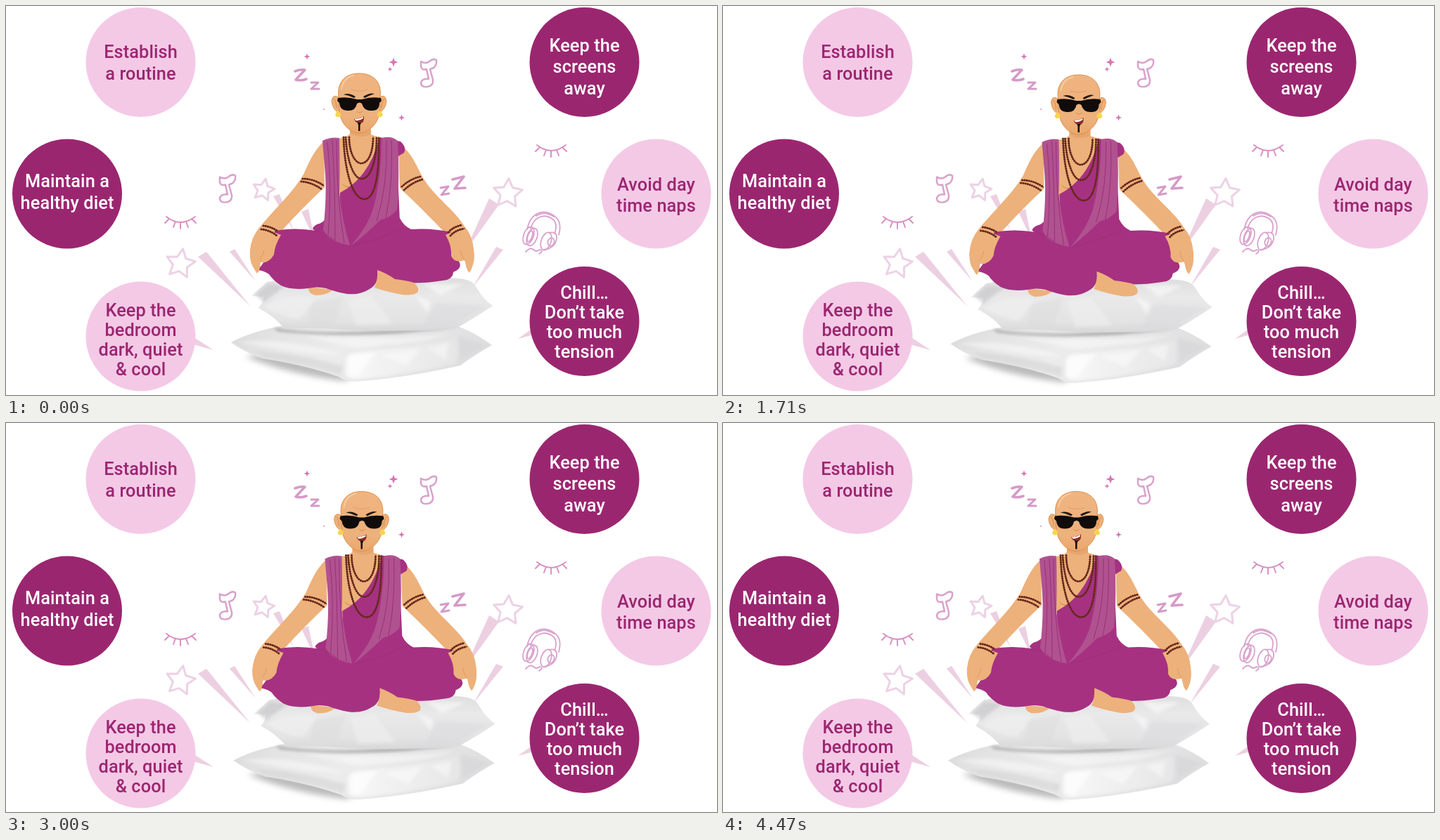
An HTML page that plays this animation: 1011 by 554 pixels, repeating every 4500 ms.

```html
<!DOCTYPE html>
<html lang="en">
<head>
<meta charset="utf-8">
<title>Better sleep tips</title>
<style>
html, body { margin: 0; width: 100%; height: 100%; overflow: hidden; background: #fff; }
svg { display: block; width: 100%; height: 100%; }
text { font: 500 25.3px Roboto, Inter, sans-serif; letter-spacing: .1px; text-anchor: middle; }
.line { fill: none; stroke-linecap: round; stroke-linejoin: round; }
.icon { stroke: #d9a2cc; }
.skin { fill: #edb17b; }
.robe { fill: #a63181; }
.shawl { fill: #b0528f; }
.fold { stroke: #9a3079; stroke-width: 1; }
.bead { stroke: #64281c; stroke-width: 3.2; stroke-dasharray: 0 3.3; }
.cord { stroke: #7a3524; stroke-width: 1.5; }
</style>
</head>
<body>
<svg id="stage" viewBox="0 0 1011 554" preserveAspectRatio="none">
  <defs>
    <linearGradient id="upper" x1="0" y1="0" x2="0" y2="1">
      <stop offset="0" stop-color="#dededf"/><stop offset=".35" stop-color="#e9e9ea"/>
      <stop offset=".8" stop-color="#e3e3e4"/><stop offset="1" stop-color="#d8d8d9"/>
    </linearGradient>
    <linearGradient id="lower" x1="0" y1="0" x2="1" y2=".25">
      <stop offset="0" stop-color="#d8d8d9"/><stop offset=".2" stop-color="#e4e4e5"/>
      <stop offset=".5" stop-color="#ececed"/><stop offset="1" stop-color="#dededf"/>
    </linearGradient>
    <linearGradient id="front" x1="0" y1="0" x2="1" y2="0">
      <stop offset="0" stop-color="#f8f8f8"/><stop offset=".5" stop-color="#efeff0"/>
      <stop offset="1" stop-color="#e6e6e7"/>
    </linearGradient>
    <linearGradient id="face" x1="0" y1="0" x2="0" y2="1">
      <stop offset="0" stop-color="#efb481"/><stop offset=".75" stop-color="#edb17b"/>
      <stop offset="1" stop-color="#eba66c"/>
    </linearGradient>
    <filter id="soft" x="-20%" y="-60%" width="140%" height="220%"><feGaussianBlur stdDeviation="4"/></filter>
    <filter id="haze" x="-20%" y="-20%" width="140%" height="140%"><feGaussianBlur stdDeviation="2"/></filter>
    <path id="note" d="M590 79 Q597 83 602 79 Q607 74 612 77 Q613 84 608 88 L603 90 L607 105 Q608 114 599 115 Q590 116 590 109 Q592 103 601 104 L598 90 Q591 92 590 86 Z"/>
    <g id="lash"><path d="M228 300 Q248 316 269 300"/><path d="M232 303 L226 309 M241 307 L238 315 M248 308 V317 M256 307 L259 315 M264 303 L270 309"/></g>
  </defs>

  <g fill="#ecd0e2">
    <path d="M273 357 L285 350 L347 427Z"/>
    <path d="M318 350 L325 346 L355 392Z"/>
    <path d="M380 271 L389 268 L409 320Z"/>
    <path d="M420 293 L430 289 L439 333Z"/>
    <path d="M687 274 L701 283 L652 351Z"/>
    <path d="M697 343 L707 347 L664 400Z"/>
    <path d="M266 471 L266 482 L295 490Z"/>
    <path d="M750 458 L750 468 L728 474Z"/>
  </g>
  <g id="stars" class="line" stroke="#ecd2e5" stroke-width="3"/>
  <g id="sparks" fill="#d873b5"/>

  <g class="line" stroke="#d59bc7" stroke-width="3.6">
    <path d="M411 93 Q418 90 425 91 L412 105 Q420 107 427 104"/>
    <path d="M434 109 L444 109 L434 118 L445 118" stroke-width="3"/>
    <path d="M618 259 L629 257 L619 269 L630 267" stroke-width="2.8"/>
    <path d="M635 247 L651 243 L638 260 L653 259"/>
  </g>
  <g class="line icon" stroke-width="2.5">
    <use href="#note"/>
    <use href="#note" x="-286" y="164.5"/>
  </g>
  <g class="line" stroke="#d991c3" stroke-width="2">
    <use href="#lash"/>
    <use href="#lash" x="527" y="-102"/>
  </g>

  <g class="line icon" stroke-width="1.8">
    <path d="M741 318 C746 294 765 287 781 300 Q791 308 786 326"/>
    <path d="M746 317 C750 301 765 294 778 304 Q785 311 780 324"/>
    <path d="M754 299 Q765 291 779 300"/>
    <ellipse cx="743" cy="327" rx="7" ry="13" transform="rotate(20 743 327)"/>
    <ellipse cx="748" cy="329" rx="7" ry="13" transform="rotate(20 748 329)"/>
    <ellipse cx="745" cy="328" rx="3" ry="8" transform="rotate(20 745 328)"/>
    <ellipse cx="768" cy="335" rx="7" ry="13" transform="rotate(18 768 335)"/>
    <path d="M772 323 Q784 320 783 332 Q780 345 765 347"/>
    <ellipse cx="775" cy="336" rx="4.5" ry="6" transform="rotate(18 775 336)"/>
    <path d="M739 350 Q746 343 750 347 T759 347 Q765 349 758 353"/>
  </g>

  <g id="tips"/>

  <g id="sitter">
    <!-- cushions -->
    <path d="M340 499 Q400 524 480 534 L500 524 L400 490Z" fill="#777" opacity=".5" filter="url(#soft)"/>
    <path d="M320 479 Q348 464 390 456 L645 457 Q668 466 691 483 Q666 497 646 512 Q570 529 507 534 Q485 537 473 528 Q425 511 365 502 Q337 492 320 479Z" fill="url(#lower)"/>
    <g filter="url(#haze)">
      <path d="M483 505 Q483 495 500 493 Q575 487 638 473 Q645 490 639 509 Q570 526 507 531 Q488 534 483 526Z" fill="url(#front)"/>
      <path d="M330 479 Q400 471 478 497 Q420 496 372 486Z" fill="#fff" opacity=".4"/>
      <path d="M350 491 Q420 495 479 513 L476 525 Q420 510 365 500Z" fill="#d2d2d3" opacity=".55"/>
      <path d="M420 470 Q520 477 635 467 L590 478 L500 487Z" fill="#fff" opacity=".4"/>
      <path d="M643 470 L682 483 L646 505Z" fill="#d0d0d1" opacity=".4"/>
      <path d="M488 498 Q507 495 525 494 Q511 512 500 528 L488 526Z" fill="#fff" opacity=".7"/>
      <path d="M535 497 L589 488 L569 513Z M600 487 L630 480 L625 504Z" fill="#fff" opacity=".4"/>
      <path d="M380 458 Q430 468 520 463 L642 458 L560 466 Q460 472 386 463Z" fill="#888" opacity=".65"/>
    </g>
    <path d="M349 413 L371 393 Q430 382 500 388 L585 391 Q632 384 655 390 Q665 393 669 401 Q679 418 692 427 Q672 441 640 459 Q565 465 480 461 Q430 457 396 460 Q382 442 359 430 Q365 423 367 414Z" fill="url(#upper)"/>
    <g filter="url(#haze)">
      <path d="M354 411 L372 396 L398 398 Q380 411 367 422Z" fill="#c4c4c6" opacity=".6"/>
      <path d="M367 428 Q400 408 440 416 L418 446 Q390 443 367 428Z" fill="#f2f2f2" opacity=".6"/>
      <path d="M434 423 L480 413 L466 455 L428 453Z" fill="#d9d9da" opacity=".4"/>
      <path d="M486 418 L520 413 L550 453 L497 455Z" fill="#f0f0f0" opacity=".6"/>
      <path d="M582 412 L604 421 L600 437Z M594 396 L650 396 L617 412Z" fill="#fff" opacity=".5"/>
      <path d="M610 423 L684 427 L641 452 L592 456Z" fill="#d8d8d9" opacity=".4"/>
    </g>

    <!-- arms -->
    <path class="skin" d="M452 193 C438 205 431 222 423 240 C407 267 378 293 360 316 Q350 329 347 348 Q346 364 352 373 L357 381 Q363 374 361 361 L392 320 Q421 288 453 258Z"/>
    <path class="skin" d="M558 196 C576 207 582 224 592 243 C607 270 638 290 652 314 Q663 326 665 347 Q667 363 662 373 L659 380 Q653 374 653 361 L626 325 Q593 290 560 259Z"/>

    <!-- feet and legs -->
    <path class="skin" d="M430 400 Q429 410 441 412 Q456 412 465 404Z"/>
    <path class="robe" d="M382 320 Q410 315 441 320 Q431 318 442 311 Q451 309 455 302 L560 302 Q565 313 576 318 Q606 316 632 322 L643 362 Q651 373 636 379 Q635 390 621 391 Q590 396 563 394 Q545 387 530 377 Q529 397 517 403 Q503 412 485 410 Q468 407 455 402 Q442 399 430 402 Q405 405 391 398 Q380 391 374 382 Q367 377 358 376 Q379 352 382 320Z"/>
    <path class="skin" d="M528 376 Q542 381 553 389 Q570 391 580 394 Q589 402 585 408 Q578 413 563 411 Q541 407 524 401 Q529 390 528 376Z"/>

    <!-- hands -->
    <path class="skin" d="M361 315 L391 326 Q382 341 381 354 Q374 367 362 365 L360 377 Q357 384 354 374 Q347 366 347 350 Q348 329 361 315Z"/>
    <path class="skin" d="M625 326 L652 314 Q663 327 665 347 Q667 363 662 374 Q658 384 655 371 L652 362 Q638 367 633 356 Q634 341 625 326Z"/>
    <path class="line" d="M361 361 Q366 355 367 348 M652 362 Q647 355 646 348" stroke="#dd9a62" stroke-width="1"/>

    <!-- torso -->
    <path class="skin" d="M489 168 H519 V183 Q530 187 546 190 L535 270 L475 272 L466 190 Q488 187 489 181Z"/>
    <path d="M489 176 Q502 186 519 176 V183 Q503 190 489 181Z" fill="#dd9b63" opacity=".5"/>
    <path class="line" d="M479 254 Q485 261 494 256" stroke="#cd864e" stroke-width="1"/>
    <path class="robe" d="M531 187 L561 193 Q570 201 566 209 L556 215 L560 307 Q554 337 491 342 L475 316 V266 Q517 244 531 187Z"/>
    <path class="shawl" d="M450 192 Q461 186 474 188 Q475 231 474 264 Q477 302 489 341 Q470 338 457 328 L451 319 Q457 267 453 228Z"/>
    <path class="shawl" d="M534 188 Q548 184 557 192 Q560 246 556 290 Q549 300 532 305 Q514 323 490 342 Q516 312 523 285 Q534 243 534 188Z"/>
    <path class="line fold" d="M457 194 Q464 255 458 326 M464 191 Q468 257 468 333 M470 192 Q470 275 481 338 M541 192 Q543 257 527 306 M548 191 Q550 259 540 301 M438 320 Q453 322 468 334 M490 342 Q528 333 562 318"/>

    <!-- beads -->
    <g id="beads" class="line"/>

    <!-- head -->
    <g class="skin" stroke="#e0944f">
      <path d="M475 132 Q465 123 463 135 Q464 148 475 153Z"/>
      <path d="M529 132 Q539 123 541 135 Q540 148 529 153Z"/>
    </g>
    <path d="M466 132 Q470 136 470 145 M538 132 Q534 136 534 145" class="line" stroke="#d98b4d"/>
    <path d="M473 130 C470 107 484 96 502 96 C521 96 535 107 532 130 C533 151 530 163 522 171 Q513 181 502 181 Q491 181 483 171 C475 162 473 151 473 130Z" fill="url(#face)" stroke="#df8e48"/>
    <path d="M477 118 Q480 102 494 99" class="line" stroke="#f6cc9f" stroke-width="2"/>
    <path d="M491 119 Q502 123 514 119" class="line" stroke="#e1a06c"/>
    <path d="M471 149 Q477 151 476 157 Q470 160 468 155Z M533 149 Q527 151 528 157 Q534 160 536 155Z" fill="#f8d44f"/>
    <path d="M480 126 Q488 123 497 129 L495 131 Q487 127 480 126Z M524 125 Q517 123 508 129 L510 131 Q518 127 524 125Z" fill="#211812"/>
    <path d="M472 131 Q486 129 499 133 H506 Q519 129 533 131 L534 135 L531 138 Q531 149 521 149 Q509 150 506 139 Q503 136 499 139 Q497 150 485 149 Q475 149 474 138 L471 135Z" fill="#100c0c"/>
    <path d="M499 150 Q502 154 507 150" class="line" stroke="#d58b52"/>
    <path d="M495 161 Q503 161 509 157 Q510 167 503 167 Q497 167 495 161Z" fill="#8b2b25"/>
    <path d="M496 161 Q503 161 508 158 L508 160 Q502 164 497 163Z" fill="#fff"/>
    <path d="M500 166 H505 L503.5 170 V178 H501 V170Z" fill="#15100e"/>
  </g>
</svg>
<script>
const PURPLE = '#9b2670', PINK = '#f4c9e6';
const LOOP = 4500, STEP = 30;
const el = id => document.getElementById(id);

const tips = [
  [191.5, 80, PINK, 74, 30.5, 'Establish|a routine'],
  [822.5, 80, PURPLE, 64.5, 30.5, 'Keep the|screens|away'],
  [87, 267.5, PURPLE, 258, 30.5, 'Maintain a|healthy diet'],
  [924.5, 267.5, PINK, 262.5, 30.5, 'Avoid day|time naps'],
  [191.5, 470.5, PINK, 442, 28, 'Keep the|bedroom|dark, quiet|& cool'],
  [822.5, 449, PURPLE, 416.5, 28, 'Chill…|Don’t take|too much|tension']
];
el('tips').innerHTML = tips.map(([x, y, fill, base, gap, words]) => {
  const ink = fill === PINK ? PURPLE : '#fff';
  const lines = words.replace('&', '&amp;').split('|')
    .map((s, i) => `<text x="${x}" y="${base + i * gap}" fill="${ink}">${s}</text>`);
  return `<circle cx="${x}" cy="${y}" r="78" fill="${fill}"/>` + lines.join('');
}).join('');

function star(cx, cy, r, inner, spikes, turn) {
  const pts = Array.from({ length: spikes * 2 }, (_, i) => {
    const a = Math.PI * (i / spikes - 0.5 + turn / 180), d = i % 2 ? r * inner : r;
    return (cx + d * Math.cos(a)).toFixed(1) + ',' + (cy + d * Math.sin(a)).toFixed(1);
  });
  return `<polygon points="${pts.join(' ')}"/>`;
}
el('stars').innerHTML = [[366, 262, 16, 12], [713.5, 267, 21.5, 4], [248, 367, 21.5, 10]]
  .map(([x, y, r, turn]) => star(x, y, r, 0.5, 5, turn)).join('');
el('sparks').innerHTML = [[428, 72, 4.5], [551, 80, 6.5], [546, 90, 3.5], [452, 147, 1.6], [562.5, 159, 4.5]]
  .map(([x, y, r]) => star(x, y, r, 0.38, 4, 0)).join('');

const strings = [
  'M480 187 C481 231 492 276 510 275 C527 274 531 231 530 187',
  'M483 187 C485 222 495 247 506 246 C519 246 527 218 527 187',
  'M488 187 C488 210 497 225 506 224 C516 223 522 207 522 187',
  'M422 246 Q438 246 452 256', 'M420 250 Q435 251 449 261',
  'M563 257 Q575 246 589 243', 'M566 262 Q578 251 592 247',
  'M366 313 Q377 314 387 321', 'M363 318 Q375 319 385 327',
  'M629 322 Q637 314 648 312', 'M632 327 Q639 319 652 317'
];
el('beads').innerHTML = strings
  .map(d => `<path class="cord" d="${d}"/><path class="bead" d="${d}"/>`).join('');

// Drift of the sitter: time, x, y
const drift = [
  [0, 0, 0], [480, 4, 1.8], [960, 7, 2], [1330, 6.5, 0.7], [1710, 3.5, 2],
  [2220, 0, -2], [2600, 2.2, 0], [3000, 3.5, 1.5], [3240, 0, 0.5],
  [3510, -4, 0.5], [3900, -3.6, 2.8], [4200, -2, 2.5], [4470, 0, 1.5]
];
function slope(i, k) {
  const a = drift[Math.max(i - 1, 0)], b = drift[Math.min(i + 1, drift.length - 1)];
  return (b[k] - a[k]) / (b[0] - a[0]);
}
function at(t, k) {
  const i = Math.max(0, drift.findIndex(p => p[0] >= t) - 1);
  const a = drift[i], b = drift[i + 1], span = b[0] - a[0], u = (t - a[0]) / span;
  const s = u * u * (3 - 2 * u), v = 1 - u;
  return a[k] + (b[k] - a[k]) * s + span * u * v * (v * slope(i, k) - u * slope(i + 1, k));
}

const sitter = el('sitter');
function draw(ms) {
  const t = Math.floor((ms % LOOP) / STEP) * STEP;
  sitter.setAttribute('transform', `translate(${at(t, 1).toFixed(2)} ${at(t, 2).toFixed(2)})`);
}
let start;
function tick(now) {
  start ??= now;
  draw(now - start);
  requestAnimationFrame(tick);
}
draw(0);
requestAnimationFrame(tick);
</script>
</body>
</html>
```
